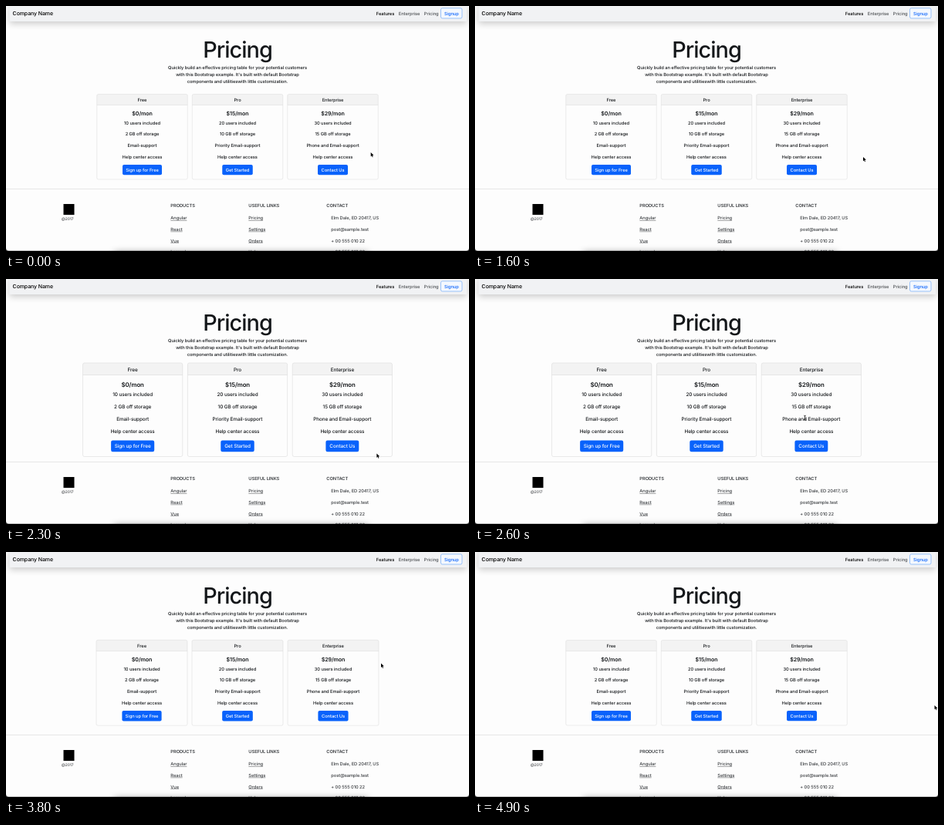
Write an HTML page with a canvas that moves like this. It is 600x318 px and loops after 5000 ms.

```html
<!DOCTYPE html>
<html lang="en">
<head>
<meta charset="utf-8">
<title>Pricing</title>
<style>
  html, body { margin: 0; width: 100%; height: 100%; overflow: hidden; background: #fdfdfd; }
  canvas { display: block; width: 600px; height: 318px; }
</style>
</head>
<body>
<canvas id="stage"></canvas>
<script>
const W = 600, H = 318, LOOP = 5000, STEP = 100;
const canvas = document.getElementById('stage');
const ctx = canvas.getContext('2d');
const dpr = window.devicePixelRatio || 1;
canvas.width = W * dpr;
canvas.height = H * dpr;

const INK = '#14171a', GREY = '#4c4f52', FOOT = '#3a3d40', BLUE = '#0962fb';
const BODY = 5.8;

// Pointer stops: time, x, y
const path = [
  [0, 472.7, 190], [600, 512, 185], [700, 512, 185], [1100, 508, 162], [1400, 508, 162],
  [1600, 503, 196], [1900, 503, 196], [2000, 481, 205], [2100, 494.7, 217.5],
  [2200, 498, 242], [2600, 427.5, 180], [3100, 455, 195], [3400, 500, 215],
  [3700, 556, 264], [3800, 486, 144.5], [4300, 469.5, 127.5], [4900, 595.5, 199]
];

// Hover changes: time, grown or not
const hovers = [[1900, 1], [3350, 0], [3794, 1], [4480, 0]];
const GROW_MS = 300;

const plans = [
  { x: 176.5, name: 'Free', price: '$0/mon', button: 'Sign up for Free', bw: 51,
    items: ['10 users included', '2 GB off storage', 'Email-support', 'Help center access'] },
  { x: 300, name: 'Pro', price: '$15/mon', button: 'Get Started', bw: 39.5,
    items: ['20 users included', '10 GB off storage', 'Priority Email-support', 'Help center access'] },
  { x: 423.5, name: 'Enterprise', price: '$29/mon', button: 'Contact Us', bw: 39,
    items: ['30 users included', '15 GB off storage', 'Phone and Email-support', 'Help center access'] }
];

const columns = [
  { x: 213.3, title: 'PRODUCTS', rows: ['Angular', 'React', 'Vue', 'Laravel'], link: true },
  { x: 314.3, title: 'USEFUL LINKS', rows: ['Pricing', 'Settings', 'Orders', 'Help'], link: true },
  { x: 415.3, title: 'CONTACT', indent: 6,
    rows: ['Elm Dale, ED 20417, US', 'post@sample.test', '+ 00 555 010 22', '+ 00 555 010 23'] }
];

// Type is set ten times larger and scaled down for precise spacing.
function text(str, x, y, { size = BODY, weight = 450, color = INK, align = 'left', track = -0.015, line = false } = {}) {
  ctx.save();
  ctx.translate(x, y);
  ctx.scale(0.1, 0.1);
  ctx.font = `${weight} ${size * 10}px Inter, "Open Sans", sans-serif`;
  ctx.letterSpacing = `${size * 10 * track}px`;
  ctx.textRendering = 'geometricPrecision';
  ctx.textAlign = align;
  ctx.fillStyle = color;
  ctx.fillText(str, 0, 0);
  if (line) ctx.fillRect(0, 8, ctx.measureText(str).width, 4.5);
  ctx.restore();
}

function box(x, y, w, h, r, fill, stroke, lw = 0.5) {
  ctx.beginPath();
  ctx.roundRect(x, y, w, h, r);
  if (fill) { ctx.fillStyle = fill; ctx.fill(); }
  if (stroke) { ctx.strokeStyle = stroke; ctx.lineWidth = lw; ctx.stroke(); }
}

function drawNav() {
  ctx.save();
  ctx.shadowColor = 'rgba(0,0,0,.2)';
  ctx.shadowBlur = 9 * dpr;
  ctx.shadowOffsetY = 3 * dpr;
  box(4.5, -4, 592.5, 24, 0, '#f1f2f4');
  ctx.restore();
  text('Company Name', 8.6, 12.4, { size: 7, color: '#000' });
  text('Features', 479.8, 12.1, { color: '#000' });
  text('Enterprise', 508.8, 12.1, { color: GREY });
  text('Pricing', 541.8, 12.1, { color: GREY });
  box(563.5, 2.8, 27.5, 13.2, 2, '#f4f8fe', '#74adfa', 0.7);
  text('Signup', 577.3, 11.5, { color: BLUE, align: 'center' });
}

function drawIntro() {
  text('Pricing', 300, 67, { size: 29, weight: 500, align: 'center', track: -0.035 });
  [
    'Quickly build an effective pricing table for your potential customers',
    "with this Bootstrap example. It's built with default Bootstrap",
    'components and utilitieswith little customization.'
  ].forEach((row, i) => text(row, 300, 82.4 + i * 9, { align: 'center' }));
}

function drawCard(p) {
  const mid = { align: 'center' }, left = p.x - 58.75;
  box(left, 114.5, 117.5, 110.5, 2, '#fdfdfd');
  box(left, 114.5, 117.5, 14.3, [2, 2, 0, 0], '#f3f3f3');
  box(left, 114.5, 117.5, 110.5, 2, null, '#d9d9d9');
  ctx.fillStyle = '#dadada';
  ctx.fillRect(left, 128.5, 117.5, 0.5);
  text(p.name, p.x, 124.1, mid);
  text(p.price, p.x, 142.4, { size: 7.1, weight: 600, align: 'center' });
  p.items.forEach((item, i) => text(item, p.x, 153.6 + i * 14.65, mid));
  box(p.x - p.bw / 2, 205.9, p.bw, 13.4, 2, BLUE);
  text(p.button, p.x, 214.6, { color: '#fff', align: 'center' });
}

function drawCards(scale) {
  ctx.save();
  ctx.translate(300, 170);
  ctx.scale(scale, scale);
  ctx.translate(-300, -170);
  plans.forEach(drawCard);
  ctx.restore();
}

function drawFooter() {
  ctx.fillStyle = '#dedede';
  ctx.fillRect(0, 237, W, 0.7);
  box(74.5, 257, 14, 14, 0, '#000');
  text('@2017', 72, 278.4, { size: 4.9, color: GREY });
  for (const c of columns) {
    text(c.title, c.x, 260.6, { weight: 600, color: FOOT });
    c.rows.forEach((row, i) =>
      text(row, c.x + (c.indent || 0), 277.2 + i * 14.7, { color: FOOT, line: c.link }));
  }
}

function drawEdge() {
  ctx.save();
  ctx.shadowColor = 'rgba(0,0,0,.35)';
  ctx.shadowBlur = 9 * dpr;
  box(140, H + 1, 330, 12, 3, '#888');
  ctx.restore();
  ctx.fillStyle = 'rgba(0,0,0,.3)';
  ctx.fillRect(0, H - 0.8, W, 0.8);
  ctx.fillStyle = '#222';
  for (const [x, d] of [[0, 1], [W, -1]]) {
    ctx.beginPath();
    ctx.moveTo(x, H - 4);
    ctx.quadraticCurveTo(x, H, x + 4 * d, H);
    ctx.lineTo(x, H);
    ctx.fill();
  }
}

function drawPointer(x, y, beam) {
  ctx.save();
  ctx.translate(x, y);
  ctx.lineJoin = 'round';
  ctx.beginPath();
  if (beam) {
    ctx.moveTo(-1.3, -2.9); ctx.lineTo(0, -2.4); ctx.lineTo(1.3, -2.9);
    ctx.moveTo(0, -2.4); ctx.lineTo(0, 2.4);
    ctx.moveTo(-1.3, 2.9); ctx.lineTo(0, 2.4); ctx.lineTo(1.3, 2.9);
    ctx.strokeStyle = '#111';
    ctx.lineWidth = 0.8;
    ctx.stroke();
  } else {
    [[0, 0], [0, 5.4], [1.2, 4.3], [2.1, 6.3], [3, 5.9], [2.1, 4], [3.8, 3.8]]
      .forEach(([px, py]) => ctx.lineTo(px, py));
    ctx.closePath();
    ctx.strokeStyle = '#fff';
    ctx.lineWidth = 0.9;
    ctx.stroke();
    ctx.fillStyle = '#000';
    ctx.fill();
  }
  ctx.restore();
}

function pointerAt(t) {
  const i = path.findIndex(k => k[0] > t);
  if (i < 0) return path[path.length - 1].slice(1);
  const [t0, x0, y0] = path[i - 1], [t1, x1, y1] = path[i];
  const u = (t - t0) / (t1 - t0);
  return [x0 + (x1 - x0) * u, y0 + (y1 - y0) * u];
}

function scaleAt(t) {
  let amount = 0;
  for (const [start, grown] of hovers) {
    if (t < start) break;
    const u = Math.min(1, (t - start) / GROW_MS);
    const eased = 1 - (1 - u) ** 2;
    amount = grown ? eased : 1 - eased;
  }
  return 1 + 0.1 * amount;
}

function draw(t) {
  ctx.setTransform(dpr, 0, 0, dpr, 0, 0);
  ctx.fillStyle = '#fdfdfd';
  ctx.fillRect(0, 0, W, H);
  drawNav();
  drawIntro();
  drawCards(scaleAt(t));
  drawFooter();
  drawEdge();
  drawPointer(...pointerAt(t), t >= 2600 && t < 2800);
}

const begin = performance.now();
function tick() {
  const t = (performance.now() - begin) % LOOP;
  draw(Math.floor(t / STEP) * STEP);
  requestAnimationFrame(tick);
}
tick();
</script>
</body>
</html>
```
